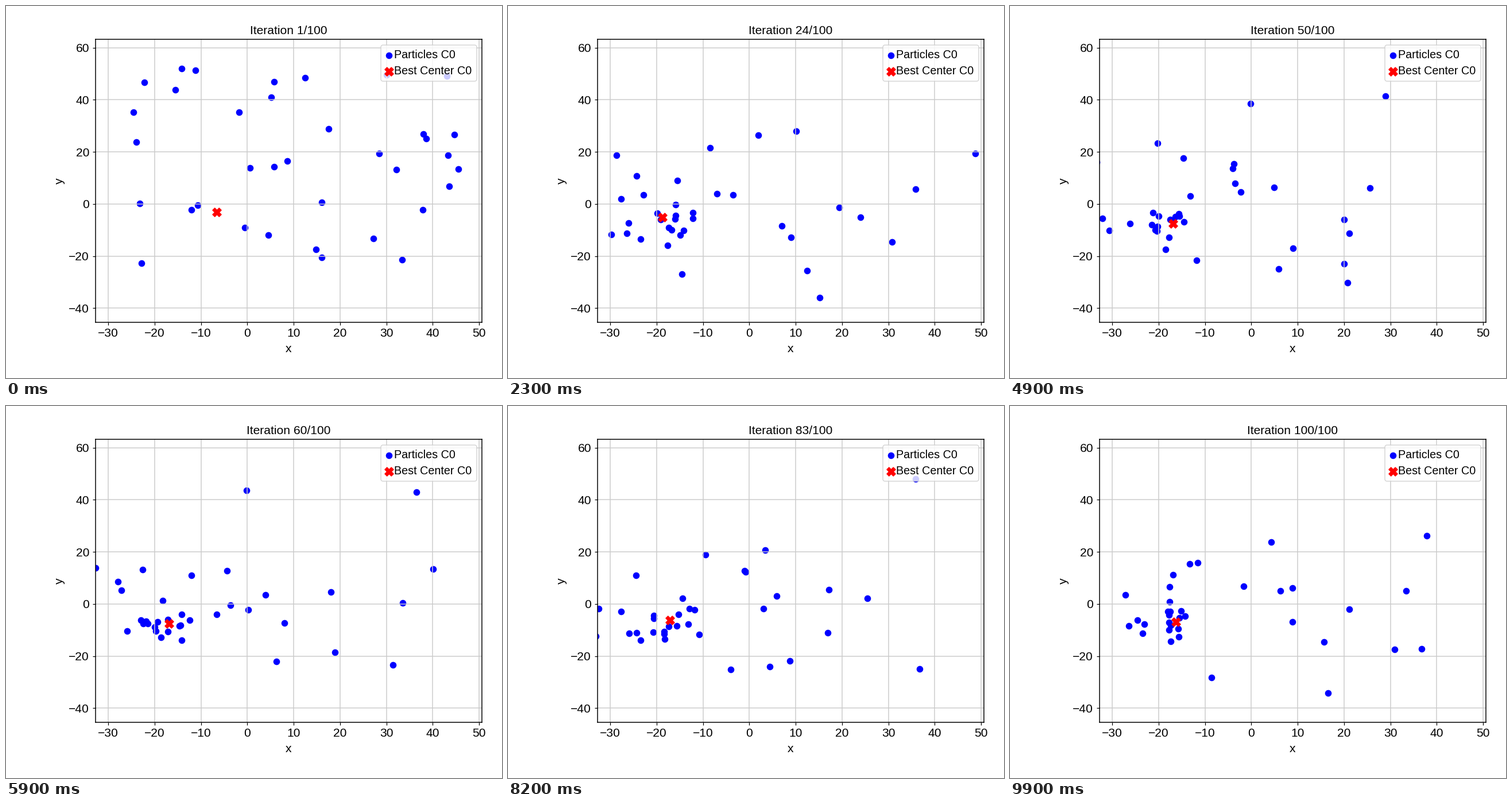
Animation of 864x648 px, one loop 10000 ms. Source, as a matplotlib script:

```python
import numpy as np
import matplotlib.pyplot as plt
from matplotlib.animation import FuncAnimation

plt.rcParams.update({
    "font.family": "Liberation Sans",
    "font.size": 14,
    "axes.linewidth": 1.0,
    "grid.linewidth": 1.0,
    "grid.color": "#cccccc",
})

STEPS = 100
NEAR, FAR = 15, 21

# (first step, x, y): the best center holds until a better one is found.
BEST = np.array([
    (0, -6.6, -3.2), (5, -18.8, -5.2), (24, -18.3, -4.6), (42, -16.9, -7.6),
    (60, -17.0, -6.9), (76, -17.2, -6.3), (92, -16.3, -6.8),
])


def best_at(step):
    row = np.searchsorted(BEST[:, 0], step, side="right") - 1
    return BEST[row, 1:]


def swarm_path(seed=7):
    """Particle swarm: each point is drawn to its own best and the shared one."""
    rng = np.random.default_rng(seed)
    n = NEAR + FAR
    near = rng.normal(best_at(STEPS), (5, 5), (NEAR, 2))
    far = np.column_stack([rng.uniform(-31, 48, FAR),
                           rng.normal(3, 24, FAR)])
    home = np.vstack([near, far])
    pos = rng.uniform((-25, -34), (47, 58), (n, 2))
    vel = np.zeros_like(pos)
    path = [pos]
    for step in range(1, STEPS):
        best = best_at(step)
        reach = np.linalg.norm(home - best, axis=1, keepdims=True)
        r1, r2 = rng.random((2, n, 1))
        kick = rng.normal(size=pos.shape) * (0.8 + 0.08 * reach)
        vel = (0.6 * vel + 0.6 * r1 * (home - pos)
               + 0.15 * r2 * (best - pos) + kick)
        pos = pos + vel
        path.append(pos)
    return path


path = swarm_path()

fig, ax = plt.subplots(figsize=(8, 6), dpi=108)
fig.subplots_adjust(left=0.18, right=0.96, bottom=0.15, top=0.91)
ax.set(xlim=(-32.81, 50.67), ylim=(-45.4, 63.13))
ax.set_xlabel("x", labelpad=5)
ax.set_ylabel("y")
ax.grid(True)

particles = ax.scatter(*path[0].T, s=45, c="blue", label="Particles C0")
center = ax.scatter(*best_at(0), s=100, c="red", marker="X",
                    label="Best Center C0")
title = ax.set_title("", fontsize=14, pad=6.5)
ax.legend(loc="upper right", fontsize=13.15, labelspacing=0.44,
          handlelength=0.6, handletextpad=0.2, scatterpoints=1)


def update(step):
    particles.set_offsets(path[step])
    center.set_offsets(best_at(step))
    title.set_text(f"Iteration {step + 1}/{STEPS}")
    return particles, center, title


anim = FuncAnimation(fig, update, frames=STEPS, interval=100,
                     repeat=True, repeat_delay=0)
plt.show()
```
